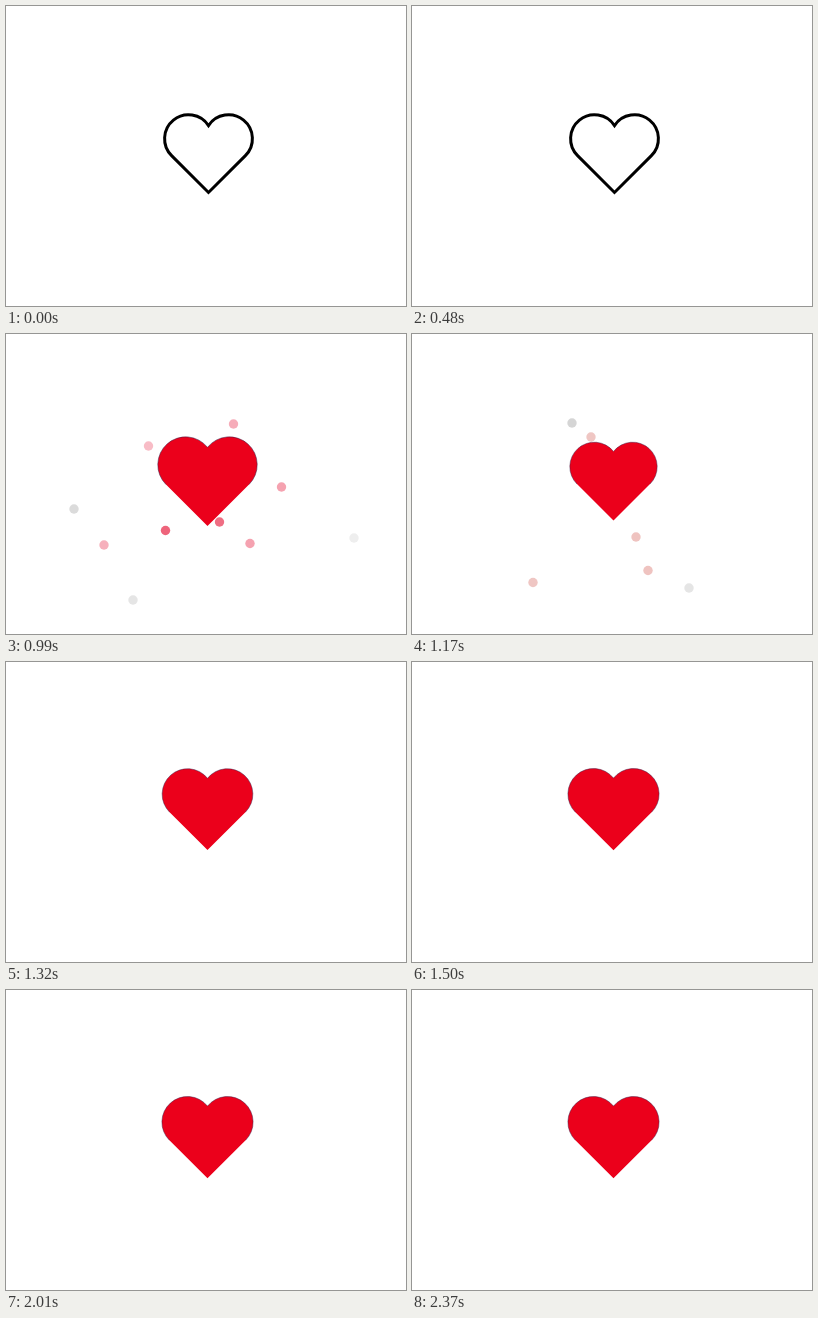
An HTML page that plays this animation: 400 by 300 pixels, repeating every 2.4 s.

```html
<!DOCTYPE html>
<html lang="en">
<head>
<meta charset="utf-8">
<title>Like heart</title>
<style>
html, body { margin: 0; width: 100%; height: 100%; overflow: hidden; background: #fff; }
svg { display: block; width: 100vw; height: 100vh; }
</style>
</head>
<body>
<svg viewBox="0 0 400 300">
  <g id="dots"></g>
  <path id="outline" fill="none" stroke="#000" stroke-width="3"/>
  <g id="full">
    <path id="fill" fill="#eb001b"/>
    <path id="rim" fill="none" stroke="#38204a" stroke-width=".8" stroke-opacity=".6"/>
  </g>
</svg>
<script>
const LOOP = 2400, STEP = 30, POP = 900;
const CX = 201.5, CY = 147;
const $ = id => document.getElementById(id);

// Two circles of radius r, centred at x - a and x + a, over a 45 degree point
function heart(x, y, a, r) {
  const d = r * Math.SQRT1_2;
  const cusp = `${x} ${y - Math.sqrt(r * r - a * a)}`;
  const left = `${x - a - d} ${y + d}`, right = `${x + a + d} ${y + d}`;
  const lobes = `M${left}A${r} ${r} 0 1 1 ${cusp}A${r} ${r} 0 1 1 ${right}`;
  return { lobes, whole: `${lobes}L${x} ${y + a + 2 * d}Z` };
}

$('outline').setAttribute('d', heart(202.5, 132.7, 20, 23.9).whole);
const solid = heart(CX, 132.1, 20, 25.6);
$('fill').setAttribute('d', solid.whole);
$('rim').setAttribute('d', solid.lobes);

// Each burst: start, time at which the dots pass their points, end, drag
const ROSE = '#e8304f', GREY = '#888', CLAY = '#d87068';
const bursts = [
  { from: 905, at: 990, to: 1110, drag: 1.2, dots: [
    [68, 175, GREY, .3], [98, 211, ROSE, .38], [127, 266, GREY, .22],
    [142.5, 112, ROSE, .32], [227.5, 90, ROSE, .4], [159.5, 196.5, ROSE, .75],
    [213.5, 188, ROSE, .7], [275.5, 153, ROSE, .45], [244, 209.5, ROSE, .45],
    [348, 204, GREY, .14]] },
  { from: 1000, at: 1080, to: 1140, drag: 1, dots: [[186, 54, GREY, .25]] },
  { from: 1010, at: 1170, to: 1280, drag: .7, dots: [
    [160, 89, GREY, .35], [179, 103, CLAY, .4], [224, 203, CLAY, .42],
    [236, 236.5, CLAY, .42], [121, 248.5, CLAY, .4], [277, 254, GREY, .22]] }
];

const dots = bursts.flatMap(burst => burst.dots.map(([x, y, color, alpha]) => {
  const el = document.createElementNS('http://www.w3.org/2000/svg', 'circle');
  el.setAttribute('r', 4.7);
  el.setAttribute('fill', color);
  $('dots').append(el);
  return { el, x, y, alpha, burst };
}));

function moveDot({ el, x, y, alpha, burst }, t) {
  const { from, at, to, drag } = burst;
  const u = (t - from) / (at - from);
  const k = (1 - Math.exp(-drag * u)) / (1 - Math.exp(-drag));
  const fade = t < from || t > to ? 0 : alpha * (to - t) / (to - at);
  el.setAttribute('cx', CX + (x - CX) * k);
  el.setAttribute('cy', CY + (y - CY) * k);
  el.setAttribute('opacity', Math.min(1, fade));
}

const scaleKeys = [[900, .86], [990, 1.09], [1170, .958], [1330, .995], [1440, 1]];

function popScale(t) {
  for (let i = 1; i < scaleKeys.length; i++) {
    const [t0, s0] = scaleKeys[i - 1], [t1, s1] = scaleKeys[i];
    if (t < t1) return s0 + (s1 - s0) * (1 - Math.cos(Math.PI * (t - t0) / (t1 - t0))) / 2;
  }
  return 1;
}

function draw(t) {
  const liked = t >= POP;
  $('outline').style.display = liked ? 'none' : '';
  $('full').style.display = liked ? '' : 'none';
  const s = liked ? popScale(t) : 1;
  $('full').setAttribute('transform', `translate(${CX} ${CY}) scale(${s}) translate(${-CX} ${-CY})`);
  dots.forEach(dot => moveDot(dot, t));
}

const start = performance.now();
function tick() {
  const t = (performance.now() - start) % LOOP;
  draw(Math.floor(t / STEP) * STEP);
  requestAnimationFrame(tick);
}
tick();
</script>
</body>
</html>
```
